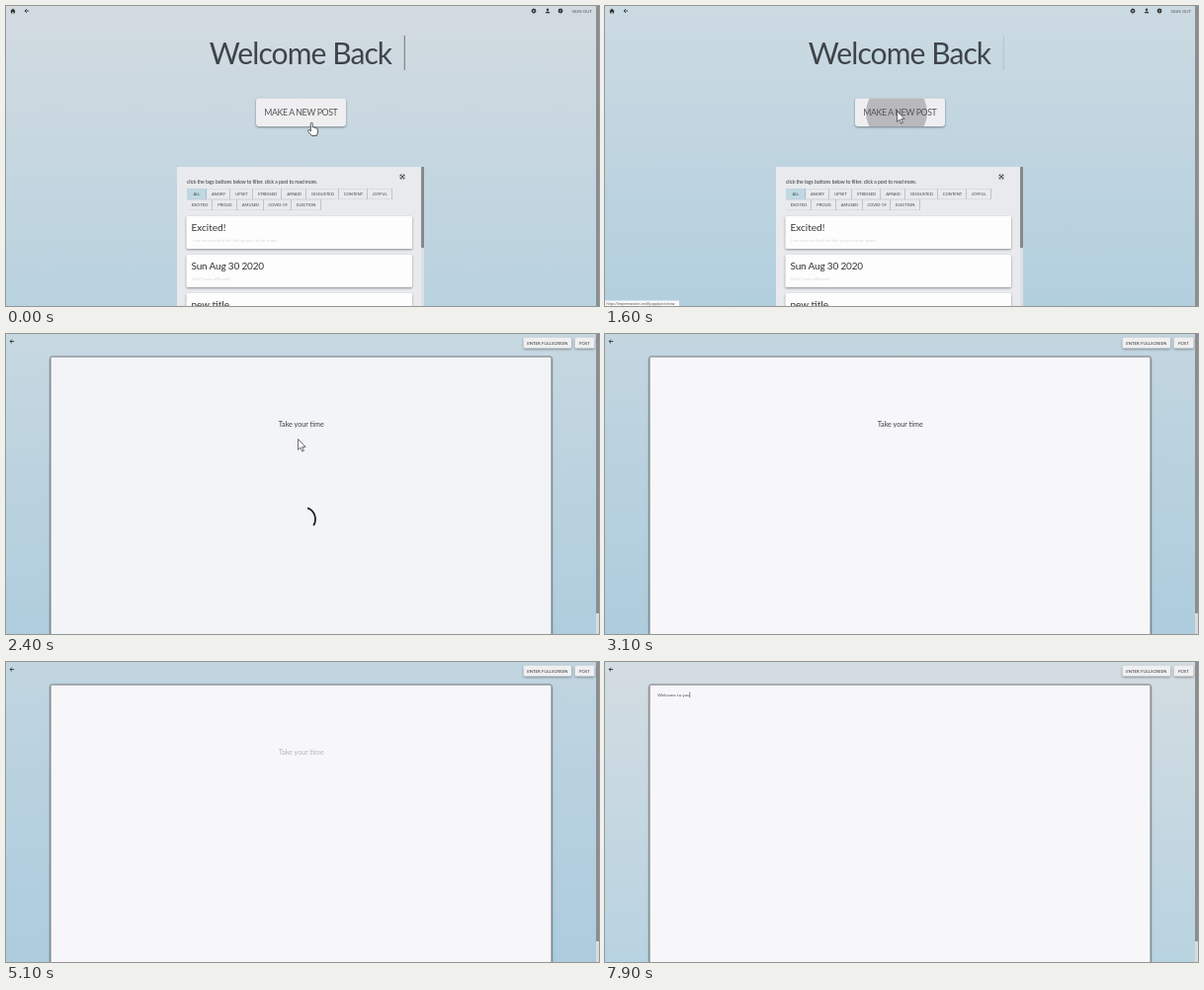
Write an HTML page that moves like this. It is 600 by 304 pixels and loops after 8 s.

```html
<!DOCTYPE html>
<html lang="en">
<head>
<meta charset="utf-8">
<title>Notes</title>
<style>
html, body { margin: 0; width: 100%; height: 100%; overflow: hidden; }
svg { display: block; width: 600px; height: 304px; }
text { font-family: Lato, "Open Sans", sans-serif; white-space: pre; }
.raised { filter: drop-shadow(0 1px 1px #0006); }
</style>
</head>
<body>
<svg id="stage" viewBox="0 0 600 304"></svg>
<script>
const LOOP = 8000;
const stage = document.getElementById('stage');

const rect = (x, y, w, h, fill, more = '') =>
  `<rect x="${x}" y="${y}" width="${w}" height="${h}" fill="${fill}" ${more}/>`;
const text = (x, y, size, str, fill = '#444', more = '') =>
  `<text x="${x}" y="${y}" font-size="${size}" fill="${fill}" ${more}>${str}</text>`;
const centred = (x, y, size, str, fill, more = '') =>
  text(x, y, size, str, fill, `text-anchor="middle" ${more}`);
const button = (x, y, w, h, r) => rect(x, y, w, h, '#efeff1', `rx="${r}" class="raised"`);
const backArrow = (x, y) =>
  `<path d="M${x + 2.2} ${y}h-4m1.8 -1.9l-1.9 1.9l1.9 1.9" fill="none" stroke="#333" stroke-width=".9"/>`;

function navBar() {
  return `<path d="M4.2 5.2L7 2.5l2.8 2.7h-.8v2.3h-1.4v-1.6h-1.2v1.6h-1.4v-2.3z" fill="#333"/>` +
    backArrow(21, 5) +
    `<circle cx="534" cy="5" r="1.5" fill="none" stroke="#333" stroke-width="1.3"/>
     <circle cx="534" cy="5" r="2.2" fill="none" stroke="#333" stroke-width=".7" stroke-dasharray="1.1 .63"/>
     <circle cx="548" cy="3.8" r="1.2" fill="#333"/>
     <path d="M545.7 7.3q0 -1.8 2.3 -1.8t2.3 1.8z" fill="#333"/>
     <circle cx="561" cy="5" r="2.4" fill="#333"/>` +
    centred(561, 6.5, 4, '?', '#dde3e8', 'font-weight="700"') +
    text(572.5, 6.6, 4.4, 'SIGN OUT', '#555');
}

function tagRow(y, left, tags) {
  let x = left, out = '';
  for (const [name, end] of tags) {
    if (name === 'ALL') out += rect(x, y, end - x, 11, '#bfd9e4');
    out += centred((x + end) / 2, y + 7, 4.1, name, '#444');
    out += rect(end - .5, y, .5, 11, '#999ca2');
    x = end;
  }
  return out + rect(left, y + 10.6, x - left, .4, '#c4c7cc') + rect(left, y, x - left, .4, '#c4c7cc');
}

function card(y, title, note) {
  return rect(182.5, y, 228.5, 33, '#fdfdfe', 'rx="1.5" class="raised"') +
    text(187.5, y + 15, 10, title, '#333', title.length > 10 ? 'letter-spacing="-.17"' : '') +
    text(188, y + 26, 4.5, note, '#d6d8dd');
}

function postList() {
  return rect(173, 163, 250, 141, '#e8eaee') +
    rect(420, 163, 3, 141, '#dde0e4') + rect(420, 163, 3, 82, '#87898c') +
    text(183, 179.5, 5, 'click the tags buttons below to filter. click a post to read more.', '#333', 'letter-spacing="-.06"') +
    `<path d="M399.2 171.2l3.6 3.6m0 -3.6l-3.6 3.6M399 172.5v-1.5h1.5M401.5 171h1.5v1.5M403 173.500v1.500h-1.500M400.500 175h-1.500v-1.500"
       fill="none" stroke="#333" stroke-width=".8"/>` +
    tagRow(185, 183, [['ALL', 203], ['ANGRY', 227], ['UPSET', 250], ['STRESSED', 279], ['AFRAID', 304],
      ['DISGUSTED', 337], ['CONTENT', 366], ['JOYFUL', 390.5]]) +
    tagRow(196, 183, [['EXCITED', 209], ['PROUD', 234], ['AMUSED', 261], ['COVID-19', 289], ['ELECTION', 318.5]]) +
    card(213, 'Excited!', 'I am very excited for this project to be done!') +
    card(252, 'Sun Aug 30 2020', 'Until I was offboard') +
    card(291, 'new title', '');
}

const home = `<g id="home">${navBar()}
  ${centred(298, 59, 30, 'Welcome Back', '#3f444a', 'letter-spacing="-.9"')}
  ${rect(402.8, 30, .9, 35, '#6b6668', 'id="titleCaret"')}
  ${button(253, 93.500, 91, 28.5, 3)}
  <circle id="ripple" cx="295" cy="108" r="31" fill="#b9b9bd" clip-path="url(#buttonClip)"/>
  ${centred(298.3, 110.700, 8.8, 'MAKE A NEW POST', '#555', 'letter-spacing="-.4"')}
  ${postList()}
  ${rect(597, 0, 3, 304, '#8b8d90')}
</g>`;

const editor = `<g id="editor">${backArrow(6, 7.5)}
  ${button(523.5, 3.5, 48.5, 11, 1.5)}${centred(547.8, 10.700, 4.35, 'ENTER FULLSCREEN', '#333')}
  ${button(575.5, 3.5, 20, 11, 1.5)}${centred(585.3, 10.700, 4.2, 'POST', '#333')}
  <rect id="paper" x="45" y="23" width="507" height="290" rx="1.5" stroke="#5a6066" stroke-width=".8" class="raised"/>
  ${centred(298.7, 94, 7.2, 'Take your time', '#3c3c40', 'id="prompt"')}
  ${text(53.3, 34.500, 4.5, '', '#555', 'id="typed"')}
  ${rect(53, 30.5, .6, 5.5, '#444', 'id="caret"')}
  <path id="spinner" fill="none" stroke="#222" stroke-width="1.8"/>
  ${rect(597, 0, 3, 304, '#d9dcdf')}${rect(597, 0, 3, 283, '#8b8d90')}
</g>`;

stage.innerHTML = `<defs>
    <linearGradient id="sky" x2="0" y2="1"><stop/><stop offset="1"/></linearGradient>
    <clipPath id="buttonClip">${rect(253, 93.500, 91, 28.5, '#000', 'rx="3"')}</clipPath>
  </defs>
  ${rect(0, 0, 600, 304, 'url(#sky)')}${home}${editor}
  <g id="link">${rect(0, 298.500, 75, 5.5, '#fafafa')}
    ${text(1.5, 302.600, 3.35, 'https://impermanotes.netlify.app/posts/new', '#444', 'style="font-family:\'Open Sans\',sans-serif"')}</g>
  <path id="hand" d="M3.300 8V1.300q0 -1.100 1 -1.100t1 1.100V5q1.500 -.8 1.900 .5q1.500 -.6 1.800 .6q1.600 -.4 1.600 1.200V10l-1.300 3.500H4.300L.8 9.200q-.7 -1.200 .3 -1.700t2.200 1.500z"
    fill="#fff" stroke="#333" stroke-width=".8"/>
  <path id="arrow" d="M0 0V10.800L2.500 8.500L4.200 12.500L5.900 11.800L4.200 7.900H7.600Z" fill="#fff" stroke="#333" stroke-width=".7"/>`;

const el = id => document.getElementById(id);
const show = (id, on) => el(id).setAttribute('display', on ? 'inline' : 'none');
const move = (id, x, y) => el(id).setAttribute('transform', `translate(${x} ${y})`);
const skyStops = document.querySelectorAll('#sky stop');

// Blend between keys [time, ...values].
function blend(keys, t) {
  let i = 0;
  while (i < keys.length - 2 && t >= keys[i + 1][0]) i++;
  const [a, b] = [keys[i], keys[i + 1]];
  const u = Math.min(1, Math.max(0, (t - a[0]) / (b[0] - a[0])));
  return a.slice(1).map((v, k) => v + (b[k + 1] - v) * u);
}
// Hold the value of the latest key [time, value].
const hold = (keys, t) => keys.filter(k => k[0] <= t).pop()?.[1];

const skyKeys = [
  [0, 211, 219, 225, 184, 210, 223],
  [1600, 204, 218, 226, 178, 207, 222],
  [3100, 195, 214, 224, 173, 204, 221],
  [5100, 193, 213, 224, 172, 204, 222],
  [7900, 211, 220, 225, 184, 211, 225]];
const promptKeys = [[0, 1], [4700, .85], [4800, .7], [5100, .35], [5200, .2], [5500, 0]];
const typedKeys = [[0, 0], [5900, 1], [6200, 2], [6700, 3], [6900, 4], [7000, 5], [7100, 6],
  [7200, 7], [7400, 9], [7500, 10], [7600, 11], [7800, 13], [7900, 14]];
const caretKeys = [[0, 0], [4300, 1], [4700, 0], [5500, 1]];
const spinKeys = [[1700, [56, 145]], [2100, [-150, -60]], [2200, [-90, -5]], [2400, [-70, 32]]];

function arc([from, to]) {
  const at = deg => {
    const a = deg * Math.PI / 180;
    return `${301 + 12 * Math.cos(a)} ${187.7 + 12 * Math.sin(a)}`;
  };
  return `M${at(from)}A12 12 0 0 1 ${at(to)}`;
}

function titleBlink(t) {
  const phase = (t / 1000 + .95) % 1, u = phase * 2 % 1;
  const eased = 1 - (1 - u) ** 2.2;
  return phase < .5 ? 1 - eased : eased;
}

function draw(t) {
  const sky = blend(skyKeys, t);
  skyStops.forEach((s, i) => s.setAttribute('stop-color', `rgb(${sky.slice(i * 3, i * 3 + 3)})`));

  const writing = t >= 1700;
  show('home', !writing);
  show('editor', writing);
  show('link', t >= 1000 && t < 2200);
  show('ripple', t >= 1600);
  el('titleCaret').setAttribute('opacity', titleBlink(t));

  show('hand', t < 1600);
  const u = Math.min(1, t / 800), ease = u * u * (3 - 2 * u);
  move('hand', 305 - 14 * ease, 118 - 12 * ease);
  show('arrow', t >= 1600 && t < 3100);
  move('arrow', ...(t < 2800 ? [295.5, 106.500] : [272.5, 88.500]));

  const [r, g, b] = blend([[1700, 241, 243, 247], [2100, 241, 243, 247], [2900, 247, 246, 249]], t);
  el('paper').setAttribute('fill', `rgb(${r},${g},${b})`);
  show('spinner', t < 2800);
  el('spinner').setAttribute('d', arc(hold(spinKeys, Math.max(t, 1700))));
  el('prompt').setAttribute('opacity', hold(promptKeys, t));

  const typed = el('typed');
  typed.textContent = 'Welcome to you'.slice(0, hold(typedKeys, t));
  const end = typed.textContent && writing ? typed.getComputedTextLength() + .3 : 0;
  show('caret', hold(caretKeys, t));
  move('caret', end, 0);
}

function tick(now) {
  draw(Math.floor(now % LOOP / 100) * 100);
  requestAnimationFrame(tick);
}
requestAnimationFrame(tick);
</script>
</body>
</html>
```
